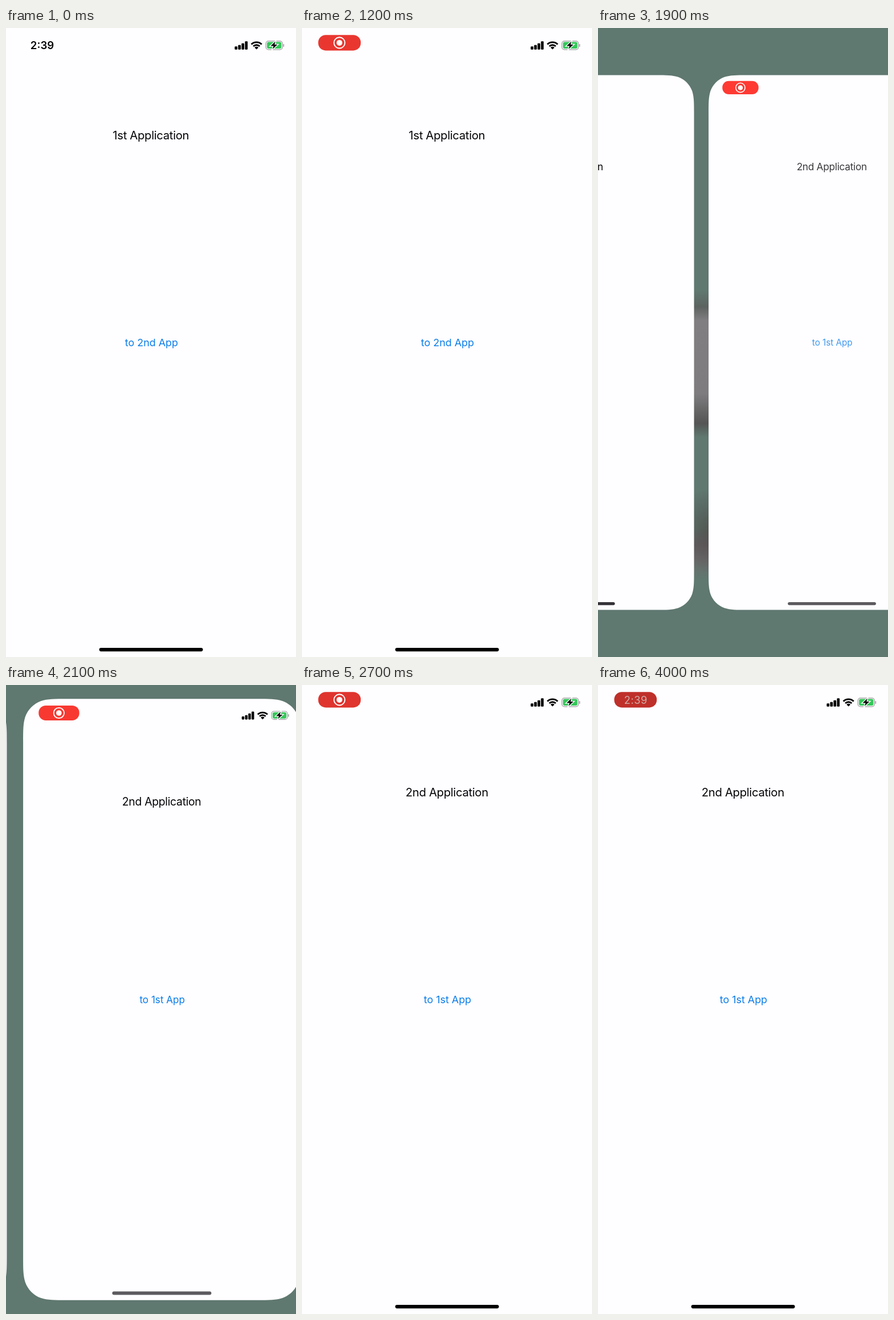
An HTML page with a canvas that plays this animation: 509x1101 px, repeating every 4100 ms.

```html
<!DOCTYPE html>
<html lang="en">
<head>
<meta charset="utf-8">
<title>Switching apps</title>
<style>
  html, body { margin: 0; width: 100%; height: 100%; overflow: hidden; background: #fefdff; }
  canvas { display: block; width: 509px; height: 1101px; }
</style>
</head>
<body>
<canvas id="stage" width="509" height="1101"></canvas>
<script>
const W = 509, H = 1101, LOOP = 4100, STEP = 100, GAP = 30;
const SWITCH_START = 1742, SWITCH_END = 2500;
const PAPER = '#fefdff', GREEN = '#5f7870', BLUE = '#0a7de8';
const ctx = document.getElementById('stage').getContext('2d');

const clamp = v => Math.max(0, Math.min(1, v));

function withAlpha(alpha, draw) {
  ctx.save();
  ctx.globalAlpha *= alpha;
  draw();
  ctx.restore();
}

function label(text, x, y, size, { color = '#050507', weight = 400, spacing = 0 } = {}) {
  ctx.font = `${weight} ${size}px Inter, sans-serif`;
  ctx.letterSpacing = `${spacing}px`;
  ctx.textAlign = 'center';
  ctx.fillStyle = color;
  ctx.fillText(text, x, y);
}

function roundBox(x, y, w, h, r, color) {
  ctx.beginPath();
  ctx.roundRect(x, y, w, h, r);
  ctx.fillStyle = color;
  ctx.fill();
}

function drawSignal() {
  [5.5, 8, 11, 14.5].forEach((h, i) => roundBox(401.4 + i * 6, 37.8 - h, 4.7, h, 1.2, '#000'));
}

function drawWifi() {
  const x = 439.7, y = 37.6, from = -Math.PI * 0.75, to = -Math.PI * 0.25;
  ctx.strokeStyle = ctx.fillStyle = '#000';
  ctx.lineWidth = 2.9;
  for (const r of [12.7, 7.9]) {
    ctx.beginPath();
    ctx.arc(x, y, r, from, to);
    ctx.stroke();
  }
  ctx.beginPath();
  ctx.moveTo(x, y);
  ctx.arc(x, y, 4.8, from, to);
  ctx.fill();
}

function drawBattery() {
  ctx.beginPath();
  ctx.roundRect(456.2, 22.8, 29, 15, 4.4);
  ctx.strokeStyle = '#98989b';
  ctx.lineWidth = 1.2;
  ctx.stroke();
  roundBox(486.6, 28, 1.5, 5, 0.8, '#98989b');
  roundBox(458.1, 24.6, 25.2, 11.4, 2.8, '#34c759');
  const bolt = new Path2D('M472.8 23.6L464.4 31.4H469.6L467.8 37L476.4 29.1H471.3Z');
  ctx.strokeStyle = '#fff';
  ctx.lineWidth = 2.6;
  ctx.stroke(bolt);
  ctx.fillStyle = '#000';
  ctx.fill(bolt);
}

function drawRecordIcon() {
  ctx.beginPath();
  ctx.arc(65.7, 25.9, 9.6, 0, Math.PI * 2);
  ctx.strokeStyle = '#fff';
  ctx.lineWidth = 1.9;
  ctx.stroke();
  ctx.beginPath();
  ctx.arc(65.7, 25.9, 5, 0, Math.PI * 2);
  ctx.fillStyle = '#fff';
  ctx.fill();
}

function pillColor(t) {
  if (t >= 4000) return '#bf302a';
  const pulse = (1 + Math.cos((t - 1800) / 2000 * Math.PI * 2)) / 2;
  return `rgb(${222 + 33 * pulse}, ${53 + 5 * pulse}, ${46 + 5 * pulse})`;
}

function drawStatus(t) {
  drawSignal();
  drawWifi();
  drawBattery();
  if (t < 100) {
    label('2:39', 63.5, 37.4, 18.7, { weight: 600 });
    return;
  }
  roundBox(28.5, 12.2, 74.6, 27.2, 13, pillColor(t));
  if (t < 3900) drawRecordIcon();
  else withAlpha(t < 4000 ? 0.4 : 1, () =>
    label('2:39', 66.3, 32.8, 18.3, { color: '#cfada6', spacing: 0.5 }));
}

function drawApp(title, link, { t, status = true, textAlpha = 1, linkAlpha = 1, bar = '#000' }) {
  if (status) drawStatus(t);
  withAlpha(textAlpha, () => {
    label(title, 254.3, 195.4, 20.3, { spacing: -0.33 });
    withAlpha(linkAlpha, () => label(link, 255.4, 557.4, 17.9, { color: BLUE }));
  });
  roundBox(163.6, 1085, 182, 6.2, 3.1, bar);
}

// Rounded corner whose curvature eases in and out, in units of the radius.
function addCorner() {
  ctx.lineTo(0, 1.529);
  ctx.bezierCurveTo(0, 1.088, 0, 0.868, 0.075, 0.631);
  ctx.bezierCurveTo(0.169, 0.373, 0.373, 0.169, 0.631, 0.075);
  ctx.bezierCurveTo(0.868, 0, 1.088, 0, 1.529, 0);
}

function cardPath() {
  const radius = 52;
  ctx.beginPath();
  for (const [x, y, turns] of [[0, 0, 0], [W, 0, 1], [W, H, 2], [0, H, 3]]) {
    ctx.save();
    ctx.translate(x, y);
    ctx.rotate(turns * Math.PI / 2);
    ctx.scale(radius, radius);
    addCorner();
    ctx.restore();
  }
  ctx.closePath();
}

function drawCard(offset, scale, draw) {
  ctx.save();
  ctx.translate(W / 2 + offset * (W + GAP) * scale, H / 2);
  ctx.scale(scale, scale);
  ctx.translate(-W / 2, -H / 2);
  cardPath();
  ctx.fillStyle = PAPER;
  ctx.fill();
  ctx.clip();
  draw();
  ctx.restore();
}

function drawBackdrop() {
  ctx.fillStyle = GREEN;
  ctx.fillRect(0, 0, W, H);
  const smudges = ctx.createLinearGradient(0, 460, 0, 970);
  const stops = [[460, GREEN], [488, '#5d6360'], [512, '#807e81'], [640, '#7e7c7f'],
    [692, '#545554'], [716, GREEN], [875, GREEN], [905, '#666466'], [930, '#6b6b6c'], [965, GREEN]];
  for (const [y, color] of stops) smudges.addColorStop((y - 460) / 510, color);
  ctx.fillStyle = smudges;
  ctx.fillRect(120, 460, 120, 510);
  const shade = ctx.createRadialGradient(204, 880, 0, 204, 880, 75);
  shade.addColorStop(0, 'rgba(70, 58, 58, 0.6)');
  shade.addColorStop(1, 'rgba(70, 58, 58, 0)');
  ctx.fillStyle = shade;
  ctx.fillRect(120, 800, 120, 160);
}

function drawFirst(options) {
  const { t } = options;
  const linkAlpha = t < 1600 ? 1 : clamp(0.4 + (t - 1700) * 0.0018);
  drawApp('1st Application', 'to 2nd App', { ...options, linkAlpha });
}

function drawSecond(options) {
  drawApp('2nd Application', 'to 1st App', options);
}

function drawSwitch(t) {
  // Critically damped slide, with the cards shrinking and growing back.
  const u = (t - SWITCH_START) * 0.0143;
  const offset = (1 + u) * Math.exp(-u);
  const scale = 1 - 0.281 * u * u * Math.exp(-u);
  drawBackdrop();
  drawCard(offset - 1, scale, () => drawFirst({ t, status: false, bar: '#353338' }));
  drawCard(offset, scale, () => drawSecond({
    t, textAlpha: clamp((t - SWITCH_START) / 200), bar: '#5c5a5e'
  }));
}

function render(t) {
  ctx.fillStyle = PAPER;
  ctx.fillRect(0, 0, W, H);
  if (t < SWITCH_START) drawFirst({ t });
  else if (t < SWITCH_END) drawSwitch(t);
  else drawSecond({ t });
}

const start = performance.now();
function tick() {
  const t = (performance.now() - start) % LOOP;
  render(Math.floor(t / STEP) * STEP);
  requestAnimationFrame(tick);
}
tick();
</script>
</body>
</html>
```
